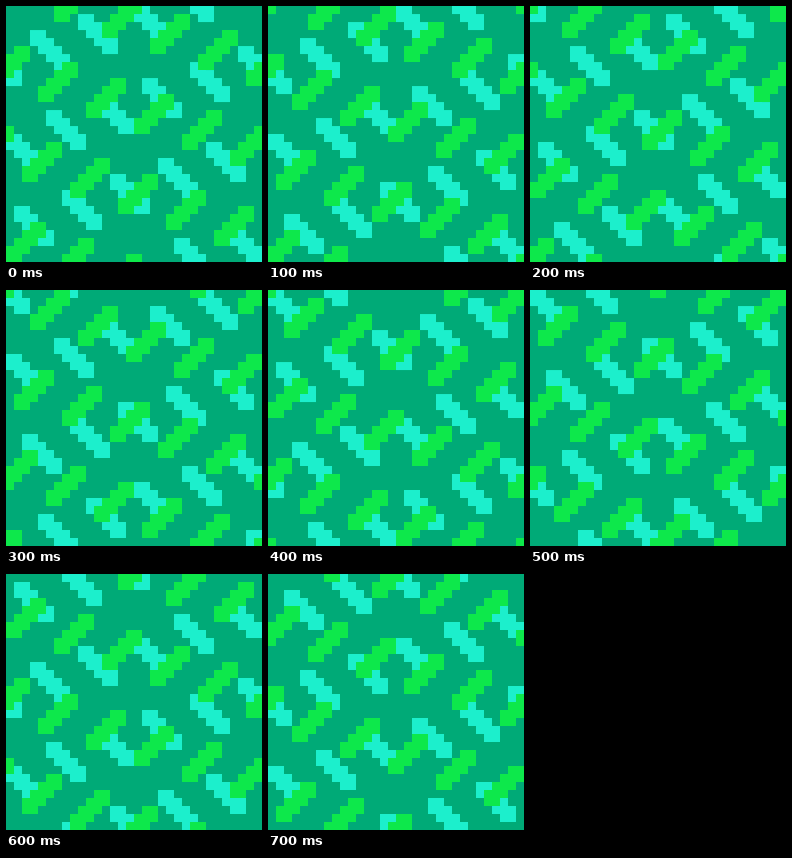
Animation, 256 px wide and 256 px high, one loop 800 ms. Source, as an HTML page:

```html
<!DOCTYPE html>
<html lang="en">
<head>
<meta charset="utf-8">
<title>Sliding bars</title>
<style>
  html, body { margin: 0; width: 100%; height: 100%; overflow: hidden; background: #00aa77; }
  svg { display: block; width: 100vw; height: 100vh; }
  .slide { animation: slide 800ms steps(8, end) infinite; }
  @keyframes slide {
    from { transform: translate(0, 0); }
    to { transform: translate(-8px, 8px); }
  }
</style>
</head>
<body>
<!-- One unit is one 8 px cell; the cyan layer mirrors the green one. -->
<svg viewBox="0 0 32 32" shape-rendering="crispEdges">
  <g transform="translate(32 0) scale(-1 1)">
    <path class="slide" fill="#1cefcc"/>
  </g>
  <path class="slide" fill="#0de84b"/>
</svg>
<script>
  const SIZE = 32;
  const bar = (x, y) => `M${x + 3} ${y}h2v2h-1v1h-1v1h-1v1h-2v-2h1v-1h1v-1h1z`;

  // Each bar sits 6 cells right of and 2 below the last, wrapping sideways.
  let d = '';
  for (let n = -12; n <= 12; n++) {
    const x = (10 + 6 * n + 4 * SIZE) % SIZE;
    for (const wrap of [-SIZE, 0, SIZE]) d += bar(x + wrap, 9 + 2 * n);
  }
  document.querySelectorAll('.slide').forEach(p => p.setAttribute('d', d));
</script>
</body>
</html>
```
